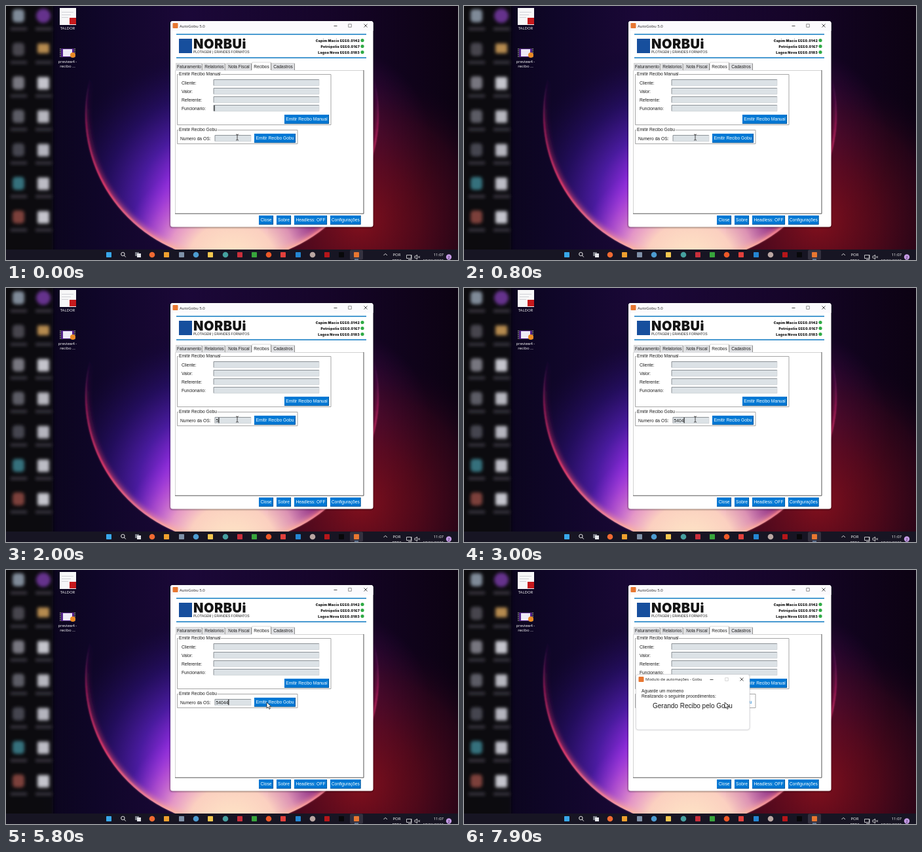
An HTML page for the animation above (8 s loop, 690 px wide and 388 px high).

```html
<!DOCTYPE html>
<html lang="pt-BR">
<head>
<meta charset="utf-8">
<title>Recibos</title>
<style>
html, body { margin: 0; width: 100%; height: 100%; overflow: hidden; background: #0d0720; }
svg { display: block; width: 690px; height: 388px; }
text { font-family: "Liberation Sans", Arial, sans-serif; white-space: pre; }
.ui { font-family: "Open Sans", "Noto Sans", sans-serif; }
.heavy { font-family: Inter, sans-serif; font-weight: 900; }
</style>
</head>
<body>
<svg id="stage" viewBox="0 0 690 388" xmlns="http://www.w3.org/2000/svg"></svg>
<script>
const LOOP = 8000, BLUE = '#0078d4', INK = '#1c1c1c';
const stage = document.getElementById('stage');

const rect = (x, y, w, h, fill, more = '') =>
  `<rect x="${x}" y="${y}" width="${w}" height="${h}" fill="${fill}" ${more}/>`;
const disc = (x, y, r, fill, more = '') => `<circle cx="${x}" cy="${y}" r="${r}" fill="${fill}" ${more}/>`;
const line = (d, stroke, width = 1, more = '') =>
  `<path d="${d}" fill="none" stroke="${stroke}" stroke-width="${width}" ${more}/>`;
const text = (x, y, s, size = 6.7, fill = INK, more = '') =>
  `<text x="${x}" y="${y}" font-size="${size}" fill="${fill}" ${more}>${s}</text>`;
const ui = (x, y, s, size = 6, fill = INK, more = '') => text(x, y, s, size, fill, `class="ui" ${more}`);
const mid = 'text-anchor="middle"', end = 'text-anchor="end"';

const stops = list => list.map(([at, color, alpha = 1]) =>
  `<stop offset="${at}" stop-color="${color}" stop-opacity="${alpha}"/>`).join('');
const radial = (id, x, y, r, list) =>
  `<radialGradient id="${id}" gradientUnits="userSpaceOnUse" cx="${x}" cy="${y}" r="${r}">${stops(list)}</radialGradient>`;
const linear = (id, x1, y1, x2, y2, list) =>
  `<linearGradient id="${id}" gradientUnits="userSpaceOnUse" x1="${x1}" y1="${y1}" x2="${x2}" y2="${y2}">${stops(list)}</linearGradient>`;
const blur = (id, d) =>
  `<filter id="${id}" x="-50%" y="-50%" width="200%" height="200%"><feGaussianBlur stdDeviation="${d}"/></filter>`;

function wallpaper() {
  return `<defs>
    ${linear('sky', 0, 0, 690, 0, [[0, '#080514'], [.2, '#0f0628'], [.4, '#1b0838'], [.7, '#16052a'], [1, '#0c0212']])}
    ${radial('ember', 540, 330, 230, [[0, '#86101c', .95], [.4, '#5e0a1a', .8], [.75, '#34061a', .6], [1, '#16021a', 0]])}
    ${radial('halo', 500, 210, 150, [[0, '#6a1878', .9], [.5, '#601058', .7], [1, '#3a0640', 0]])}
    ${radial('orb', 330, 310, 260, [[0, '#c040e8'], [.35, '#8a2ad8'], [.5, '#4c1ca4', .95], [.7, '#260f66', .8], [.9, '#150838', .5], [1, '#10062c', 0]])}
    ${radial('flare', 345, 400, 175, [[0, '#ffecc8'], [.4, '#fbd0c0'], [.58, '#eda2c4', .9], [.78, '#c45cd0', .6], [1, '#8a2bd8', 0]])}
    ${linear('rim', 0, 110, 0, 388, [[0, '#50206a', 0], [.25, '#a01c58', .7], [.6, '#e83c68'], [.85, '#f88890'], [1, '#ffd8b0']])}
    ${blur('soft', 4)}${blur('fuzz', 1)}${blur('smear', 2.6)}
    <clipPath id="inside"><circle cx="345" cy="165" r="224"/></clipPath></defs>
    ${['sky', 'halo', 'ember'].map(id => rect(0, 0, 690, 388, `url(#${id})`)).join('')}
    <g clip-path="url(#inside)">${rect(0, 0, 400, 388, 'url(#orb)')}${rect(0, 0, 690, 388, 'url(#flare)')}
      ${disc(345, 163, 224, 'none', 'stroke="url(#rim)" stroke-width="6" filter="url(#soft)"')}</g>
    ${disc(345, 164.500, 223, 'none', 'stroke="url(#rim)" stroke-width="2.600" filter="url(#fuzz)"')}`;
}

function desktop() {
  const left = ['#7f8a98', '#46444e', '#77767f', '#5c5b65', '#45454f', '#34707c', '#7c403a'];
  const right = ['#65308c', '#b58a50', '#c4c4cc', '#b6b6be', '#b4b4bd', '#bcbcc5', '#c4c4cc'];
  let s = rect(-8, -8, 80, 388, '#08070d', 'opacity=".8" filter="url(#smear)"') + '<g filter="url(#smear)">';
  left.forEach((color, i) => {
    const y = 15 + 51.2 * i;
    s += rect(10, y - 10, 18, 20, color, 'rx="5"');
    s += i ? rect(48, y - 9, 18, i === 1 ? 15 : 19, right[i], 'rx="2"') : disc(57, y, 11, right[i]);
    s += rect(7, y + 18, 25, 4, '#3c3a44') + rect(45, y + 18, 25, 4, '#3c3a44');
  });
  s += '</g>' + rect(82, 3, 25, 26, '#f7f7f8');
  for (let i = 0; i < 3; i++) s += rect(85, 9 + i * 4, 18 - i * 4, .6, '#b9bbc2');
  s += rect(97, 18, 10, 10, '#c5191d') + ui(94, 36, 'TALDOR', 6, '#fff', mid);
  s += rect(82, 64, 24, 15, '#18151f') + rect(84, 65, 20, 13, '#54248c') + rect(87, 66, 14, 11, '#eeeaf6');
  for (let i = 0; i < 5; i++) s += rect(82.4, 65 + i * 2.8, 1, 1.3, '#ddd') + rect(104.6, 65 + i * 2.8, 1, 1.3, '#ddd');
  s += disc(102, 75, 4, '#e98a25');
  return s + ui(94, 87, 'preview4 -', 6, '#fff', mid) + ui(94, 94, 'recibo ...', 6, '#fff', mid);
}

function taskbar() {
  const icons = [[157, '#38a7ea'], [223, '#ef6a32', 1], [245, '#eea02f'], [268, '#7f91a8'], [290, '#4d9bd0', 1],
    [312, '#f2c64f'], [335, '#46a0a0', 1], [357, '#c92f3b'], [379, '#38a53c'], [401, '#ee5827', 1],
    [423, '#e2403c'], [446, '#2486d2'], [468, '#b9a6a2', 1], [490, '#b5161a'], [512, '#08080a']];
  let s = rect(0, 372, 690, 16, '#171523') + rect(525, 372.5, 20, 15, '#34313f', 'rx="2"');
  for (const [x, color, round] of icons)
    s += round ? disc(x, 380, 4.3, color) : rect(x - 4, 376, 8, 8, color, 'rx=".7"');
  s += rect(531, 376, 8, 8, '#e87731', 'rx="1"') + rect(532, 386.5, 6, 1, '#8fb9e6');
  s += disc(178.4, 379, 2.7, 'none', 'stroke="#eee" stroke-width="1"') + line('M180.4 381l2.4 2.6', '#eee');
  s += rect(197, 376, 6, 6, '#777b84') + rect(200, 378, 6, 6, '#e4e5ea');
  s += line('M576.5 381l2.7-2.7 2.7 2.7', '#eee', .9);
  s += ui(596.5, 382, 'POR', 6, '#fff', mid) + ui(596.5, 390.5, 'PTB2', 6, '#fff', mid);
  s += line('M611.5 380.5h7v5h-7zM614 387.5h5M619 380v7', '#eee', .8);
  s += line('M624 382h1.5l2-2v7l-2-2H624zM629 382l3 3m0-3l-3 3', '#eee', .8);
  s += ui(668, 382, '11:07', 6, '#fff', end) + ui(668, 390.5, '17/01/2022', 6, '#fff', end);
  return s + disc(676, 383.5, 4.2, '#c59be6') + ui(676, 385.7, '2', 6, '#281638', mid);
}

const controls = (xs, y, maxColor) =>
  line(`M${xs[0] - 2.5} ${y + .5}h5`, '#222', .8) +
  line(`M${xs[1] - 2.3} ${y - 2.3}h4.6v4.6h-4.6z`, maxColor, .8) +
  line(`M${xs[2] - 2.5} ${y - 2.5}l5 5m0-5l-5 5`, '#222', .8);

const field = (x, y, w) => rect(x, y, w, 10, '#dce2e6') +
  line(`M${x} ${y + 9.5}V${y + .5}H${x + w}`, '#8c9196') + line(`M${x} ${y + 9.7}h${w}V${y}`, '#c9ced2', .6);

const button = (x, y, w, label, id = '') => `<g ${id && `id="${id}"`}>` +
  rect(x, y, w, 14, BLUE) + line(`M${x} ${y + 13.6}h${w - .4}V${y}`, '#07508c', .8) +
  text(x + w / 2, y + 9.4, label, 6.7, '#fff', mid) + '</g>';

const group = (x, y, w, h, label, gap) =>
  line(`M${x + .5} ${y + .5}h${w}v${h}h-${w}z`, '#a6a6a6') +
  rect(x + 2, y - 2, gap, 6, '#fff') + text(x + 3, y + 2.4, label);

function mainWindow() {
  let s = rect(250, 23, 311, 316, '#000', 'rx="4" opacity=".35" filter="url(#fuzz)"');
  s += rect(251, 23, 309.5, 314.5, '#fff', 'rx="3.5"') + '<path d="M251 38V26.5q0-3.5 3.5-3.5H557q3.5 0 3.5 3.5V38z" fill="#fbfafd"/>';
  s += rect(254.5, 26, 8, 8, '#e87731', 'rx="1"') + ui(265, 32.6, 'AutoGobu 5.0') + controls([503, 525, 549], 30, '#777');
  s += rect(260, 42.5, 290, 1.6, '#1a80c5') + rect(260, 78.3, 290, 1.6, '#1a80c5');
  s += rect(264, 50, 20, 22, '#174f9d');
  s += text(286, 65.4, 'NORBUi', 20, '#151515', 'class="heavy" letter-spacing=".5"') + text(286, 72.4, 'PLOTAGEM | GRANDES FORMATOS', 5, '#222');
  ['Capim Macio 5550.0142', 'Petrópolis 5550.0167', 'Lagoa Nova 5550.0183'].forEach((label, i) => {
    s += text(540, 54.5 + 9 * i, label, 5.2, '#151515', `class="heavy" letter-spacing=".2" ${end}`) + disc(544, 52.5 + 9 * i, 2.6, '#2faa45');
  });

  s += line('M258.5 317V98.5H546', '#d2d2d2') + line('M258 317.2h288V98', '#555');
  for (const [x, w, label] of [[259, 41, 'Faturamento'], [301, 34, 'Relatorios'], [336, 39, 'Nota Fiscal'], [375, 30, 'Recibos'], [405, 36, 'Cadastros']]) {
    const on = label === 'Recibos', y = on ? 85.5 : 87;
    s += rect(x, y, w, 99 - y, on ? '#fff' : '#dfe0e3') + line(`M${x + .5} 98V${y + .5}h${w - 1}`, '#d0d0d0', .8) +
      line(`M${x + w - .5} ${y + 1}V98`, '#777', .8) + text(x + w / 2, 95, label, 6.5, INK, mid);
  }

  s += group(261, 104, 234.5, 77, 'Emitir Recibo Manual', 65);
  ['Cliente:', 'Valor:', 'Referente:', 'Funcionario:'].forEach((label, i) => {
    s += text(268, 119.8 + 13.1 * i, label) + field(317, 112 + 13 * i, 161);
  });
  s += button(425, 166, 68, 'Emitir Recibo Manual');
  s += group(261, 189, 183.5, 21, 'Emitir Recibo Gobu', 60);
  s += text(266, 204.6, 'Numero da OS:') + field(319, 197, 55) + button(379, 195, 63, 'Emitir Recibo Gobu', 'issue');
  s += text(320.5, 204.6, '', 6.7, INK, 'id="order"') + rect(0, 0, 1, 8.5, '#000', 'id="caret"');
  for (const [x, w, label] of [[386, 22, 'Close'], [413, 22, 'Sobre'], [440, 50, 'Headless: OFF'], [495, 46.5, 'Configurações']])
    s += button(x, 320, w, label);
  return s;
}

function dialog() {
  return '<g id="dialog">' + rect(262, 159.5, 174.5, 85.5, '#000', 'rx="4" opacity=".12" filter="url(#fuzz)"') +
    rect(262.5, 159.5, 173.5, 84.5, '#fff', 'rx="3.5" stroke="#d2d2d6" stroke-width=".7"') +
    rect(266.5, 163, 8, 8, '#e87731', 'rx="1"') + ui(277, 169.4, 'Modulo de automações - Gobu') +
    controls([378, 401, 424], 167, '#ccc') +
    text(271, 186.5, 'Aguarde um momeno') + text(271, 194.6, 'Realizando o seguinte procedimentos:') +
    text(288, 210.6, 'Gerando Recibo pelo Gobu', 10) + '</g>';
}

const pointers =
  line('M-2-4.5q2 0 2 1v7q0 1-2 1M2-4.5q-2 0-2 1m0 7q0 1 2 1', '#222', .8, 'id="beam"') +
  '<path id="arrow" d="M0 0v9l2.2-2 1.6 3.3 1.5-.7-1.5-3.2h3z" fill="#fff" stroke="#111" stroke-width=".7"/>';

stage.innerHTML = wallpaper() + desktop() + taskbar() + mainWindow() + dialog() + pointers;
const [order, caret, issue, popup, beam, arrow] =
  ['order', 'caret', 'issue', 'dialog', 'beam', 'arrow'].map(id => document.getElementById(id));
const [issueFace, issueEdge, issueLabel] = issue.children;
const show = (el, on) => el.setAttribute('visibility', on ? 'visible' : 'hidden');

const NUMBER = '54044', KEYS = [1900, 2300, 2600, 2900, 3800];
const FOCUS = 1000, PRESS = 6000, POPUP = 6200;

function draw(t) {
  const typed = KEYS.filter(k => k <= t).length;
  order.textContent = NUMBER.slice(0, typed);

  // The caret restarts its 600 on / 300 off blink at every key.
  const focused = t >= FOCUS;
  const since = t - (typed ? KEYS[typed - 1] : focused ? FOCUS : 0);
  show(caret, since % 900 < 600);
  caret.setAttribute('x', focused ? 320.7 + typed * 6.7 * .556 : 317.6);
  caret.setAttribute('y', focused ? 197.8 : 152);

  const p = Math.min(1, Math.max(0, (t - 4900) / 600)), e = p * p * (3 - 2 * p);
  const x = 353 + 45 * e, y = 200.5 + 1.7 * e;
  for (const el of [beam, arrow]) el.setAttribute('transform', `translate(${x} ${y})`);
  show(beam, x < 374);
  show(arrow, x >= 374);

  const pressed = t >= PRESS;
  issueFace.setAttribute('fill', pressed ? '#fff' : BLUE);
  issueLabel.setAttribute('fill', pressed ? BLUE : '#fff');
  show(issueEdge, !pressed);

  const fade = Math.min(1, Math.max(0, (t - POPUP) / 200));
  show(popup, fade > 0);
  popup.setAttribute('opacity', fade);
}

const start = performance.now();
function tick() {
  draw((performance.now() - start) % LOOP);
  requestAnimationFrame(tick);
}
tick();
</script>
</body>
</html>
```
